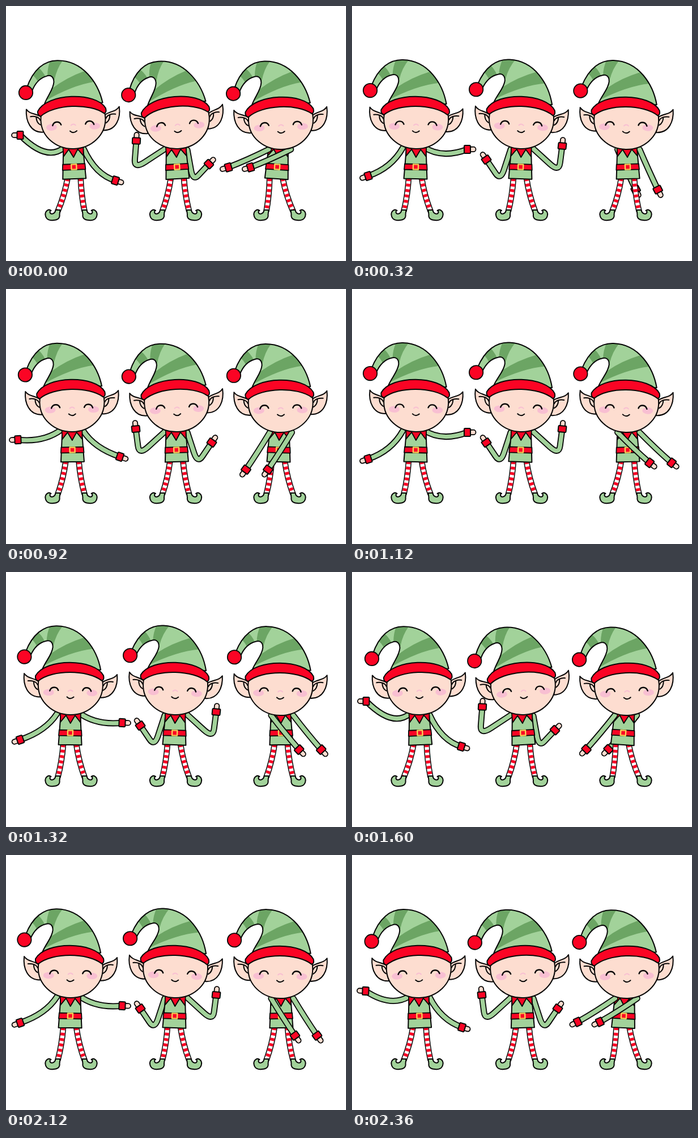
An HTML page with a canvas that plays this animation: 600x450 px, repeating every 2.4 s.

```html
<!DOCTYPE html>
<html lang="en">
<head>
<meta charset="utf-8">
<title>Dancing elves</title>
<style>
  html, body { margin: 0; width: 100%; height: 100%; overflow: hidden; background: #fff; }
  canvas { display: block; width: 600px; height: 450px; }
</style>
</head>
<body>
<canvas id="stage" width="600" height="450"></canvas>
<script>
const ctx = document.getElementById('stage').getContext('2d');
const LOOP = 2400, STEP = 40, BEAT = 400;
const INK = '#050505', GREEN = '#a2d29a', DARK = '#6ca564', RED = '#fb0424',
      SKIN = '#fdddd0', PINK = '#f8bfd2', GOLD = '#f8cf57';

const shape = {
  hat: new Path2D('M-80,-60 C-68,-92 -48,-107 -25,-106.5 C20,-106 46,-65 53,-30 L-50,-30 C-44,-45 -33,-56 -32,-69 C-32,-79 -38,-82 -45,-79.5 C-58,-76 -66,-66 -71,-54 Z'),
  stripes: new Path2D('M-75,-87 L-62,-98 Q-52,-91 -46,-78 L-58,-66 Q-64,-80 -75,-87 Z M-36,-109 L-13,-109 Q-26,-94 -31,-72 L-43,-78 Q-43,-96 -36,-109 Z M-36,-57 Q-10,-76 24,-87 L39,-67 Q0,-62 -50,-35 Z'),
  band: new Path2D('M-62,-18 C-45,-50 42,-50 58,-20 Q60,-12 55,-11 C30,-30 -32,-30 -57,-9 Q-63,-11 -62,-18 Z'),
  ear: new Path2D('M-56,-8 C-66,-15 -76,-13 -82,-22 C-84,-2 -76,20 -53,19 Z'),
  earFold: new Path2D('M-75,-9 C-68,-10 -60,-8 -58,-2 M-65,-8 Q-65,2 -58,6'),
  face: new Path2D('M-57,-2 A57,52 0 1 1 57,-2 A57,52 0 1 1 -57,-2 Z'),
  eye: new Path2D('M-36.5,8 C-34,0 -24,0 -21.5,7'),
  nose: new Path2D('M-4,8.5 Q0,4.5 4,8.5'),
  mouth: new Path2D('M-6,18.5 Q0,24 6,18.5'),
  dress: new Path2D('M-17,-4 L17,-4 L20.5,55 L-20.5,55 Z'),
  belt: new Path2D('M-19.6,29 L19.6,29 L20.3,39 L-20.3,39 Z'),
  collar: new Path2D('M-18,-4 L18,-4 L17.5,15 L8,3 L0,17 L-8,3 L-17.5,15 Z'),
  shoe: new Path2D('M-4,0 C-5,7 -13,9 -14,4 C-14,2 -13,1 -12,1 C-17,-3 -23,3 -22,9 C-21,17 -14,19 -8,18 C0,18 4,14 3,8 L4,0 Z')
};

// Left-arm poses: phase, cuff x y, elbow x y, shoulder x y, hand angle
const waveArm = [
  [0, 25, 228, 72, 275, 102, 250, 180],
  [.1, 24, 240, 68, 269, 100, 250, 183],
  [.3, 21, 266, 67, 271, 98, 248, 178],
  [.4, 22, 272.5, 64, 273, 97, 248, 173],
  [.6, 22, 290, 67, 280, 92, 248, 164],
  [.7, 25, 296, 70, 281, 90, 250, 161],
  [.9, 32, 304, 69, 291, 89, 251, 163],
  [1, 33, 308, 68, 298, 89, 252, 163]
];
const bentArm = [
  [0, 230, 238, 226, 288, 281, 252, -87],
  [.2, 229, 247, 235, 293, 280, 252, -96],
  [.4, 230, 256, 246, 301, 280, 252, -108],
  [.6, 232, 261, 253, 304, 280, 252, -113],
  [.8, 237, 271, 262, 308, 280, 253, -125],
  [1, 242, 279, 270, 309, 280, 254, -135]
];
// Straight-arm swing angle at each beat, positive to the left
const swing = [66, -40, 66, -66, 40, -66, 66];

const mix = (a, b, k) => a + (b - a) * k;
const rad = d => d * Math.PI / 180;

function pose(rows, p) {
  let i = 1;
  while (i < rows.length - 1 && rows[i][0] < p) i++;
  const a = rows[i - 1], b = rows[i], k = (p - a[0]) / (b[0] - a[0]);
  return a.map((v, n) => mix(v, b[n], k)).slice(1);
}

function sway(t) {
  const u = t % (2 * BEAT) / BEAT;
  return u < 1 ? u : 2 - u;
}

function at(x, y, deg, draw) {
  ctx.save();
  ctx.translate(x, y);
  ctx.rotate(rad(deg));
  draw();
  ctx.restore();
}

function mirror(x, draw) {
  ctx.save();
  ctx.translate(2 * x, 0);
  ctx.scale(-1, 1);
  draw();
  ctx.restore();
}

function line(path, color, width) {
  ctx.strokeStyle = color;
  ctx.lineWidth = width;
  ctx.stroke(path);
}

function paint(path, fill, width = 2) {
  ctx.fillStyle = fill;
  ctx.fill(path);
  if (width) line(path, INK, width);
}

function oval(x, y, rx, ry, fill, width) {
  const p = new Path2D();
  p.ellipse(x, y, rx, ry, 0, 0, 7);
  paint(p, fill, width);
}

function box(x, y, w, h, r) {
  const p = new Path2D();
  p.roundRect(x, y, w, h, r);
  return p;
}

function arm([cx, cy, ex, ey, sx, sy, angle], bend) {
  const p = new Path2D();
  p.moveTo(cx, cy);
  p.lineTo(mix(ex, cx, bend), mix(ey, cy, bend));
  p.quadraticCurveTo(ex, ey, mix(ex, sx, bend), mix(ey, sy, bend));
  p.lineTo(sx, sy);
  line(p, INK, 11);
  line(p, GREEN, 7.4);
  at(cx, cy, angle, () => {
    paint(box(2, -4.2, 13, 8.4, 4.2), SKIN, 1.8);
    paint(box(-5.5, -7, 11, 14, 1.5), RED);
  });
}

function leg(hx, hy, fx, side) {
  const p = new Path2D();
  p.moveTo(hx, hy - 2);
  p.quadraticCurveTo(mix(hx, fx, .4) - side * 1.5, 334, fx, 362);
  ctx.lineCap = 'butt';
  line(p, INK, 10.5);
  line(p, '#fff', 7.5);
  ctx.setLineDash([5, 4.6]);
  line(p, RED, 7.5);
  ctx.setLineDash([]);
  ctx.lineCap = 'round';
}

function legs(foot, x, rot) {
  const hx = x - 55 * Math.sin(rad(rot)), fx = 23.5;
  leg(hx - 12, 306, foot - fx, -1);
  leg(hx + 11, 306, foot + fx, 1);
  const shoe = () => at(foot - fx, 360, 0, () => paint(shape.shoe, GREEN));
  shoe();
  mirror(foot, shoe);
}

function torso(x, rot) {
  at(x, 250, rot, () => {
    paint(shape.dress, GREEN);
    paint(shape.belt, RED, 1.8);
    line(box(-4.5, 29.5, 9, 9, 0), GOLD, 2.4);
    paint(shape.collar, RED, 1.8);
  });
}

function head(x, y, rot) {
  at(x, y, rot, () => {
    const ear = () => {
      paint(shape.ear, SKIN);
      line(shape.earFold, INK, 2);
    };
    ear();
    mirror(0, ear);
    paint(shape.face, SKIN);
    oval(-38.5, 11, 9.5, 5.8, PINK, 0);
    oval(38, 11, 9.5, 5.8, PINK, 0);
    line(shape.eye, INK, 2.4);
    mirror(0, () => line(shape.eye, INK, 2.4));
    line(shape.nose, PINK, 2);
    line(shape.mouth, INK, 2);
    paint(shape.hat, GREEN, 0);
    ctx.save();
    ctx.clip(shape.hat);
    paint(shape.stripes, DARK, 0);
    ctx.restore();
    line(shape.hat, INK, 2);
    paint(shape.band, RED);
    oval(-82, -51.5, 12.2, 12.2, RED, 1.8);
  });
}

// An elf whose right arm is the left one mirrored in space and phase
function pairElf(p, o) {
  const x = mix(...o.neck, p), rot = mix(...o.lean, p);
  legs(o.foot, x, rot);
  arm(pose(o.arm, p), o.bend);
  mirror(o.axis, () => arm(pose(o.arm, 1 - p), o.bend));
  torso(x, rot);
  head(mix(...o.head, p), 202, mix(...o.tilt, p));
}

function flossElf(t) {
  const p = sway(t), x = mix(480.7, 486.7, p), rot = mix(3.6, -3, p);
  const beat = Math.floor(t / BEAT), u = t / BEAT - beat;
  const ease = (u + (1 - Math.cos(Math.PI * u)) / 2) / 2;
  const a = mix(swing[beat], swing[beat + 1], ease);
  const straight = sx => {
    const cx = sx - 78 * Math.sin(rad(a)), cy = 253 + 78 * Math.cos(rad(a));
    arm([cx, cy, (cx + sx) / 2, (cy + 253) / 2 + 2, sx, 253, 90 + a * 1.12], 1);
  };
  const left = () => straight(x - 17), right = () => straight(x + 22);
  const leftBack = t < 2 * BEAT && a < 0;
  const rightBack = t > 3 * BEAT && t < 5 * BEAT && a > 0;

  if (leftBack) left();
  if (rightBack) right();
  legs(483, x, rot);
  torso(x, rot);
  if (!leftBack) left();
  if (!rightBack) right();
  head(mix(485, 483.9, p), 203, mix(-2.2, 2.2, p));
}

function draw(t) {
  ctx.fillStyle = '#fff';
  ctx.fillRect(0, 0, 600, 450);
  ctx.lineJoin = ctx.lineCap = 'round';
  pairElf(sway(t), {
    foot: 115, neck: [118.5, 112], lean: [-2.3, 2.3], head: [118.5, 111.8],
    tilt: [-1.7, 1.7], arm: waveArm, bend: 1, axis: 113
  });
  // The middle elf moves on every second step
  pairElf(sway(Math.floor(t / 80) * 80), {
    foot: 299.5, neck: [300, 298.5], lean: [-3, 3.2], head: [302, 298.2],
    tilt: [-4.5, 4], arm: bentArm, bend: .35, axis: 300
  });
  flossElf(t);
}

const start = performance.now();
function tick() {
  const t = (performance.now() - start) % LOOP;
  draw(Math.floor(t / STEP) * STEP);
  requestAnimationFrame(tick);
}
tick();
</script>
</body>
</html>
```
